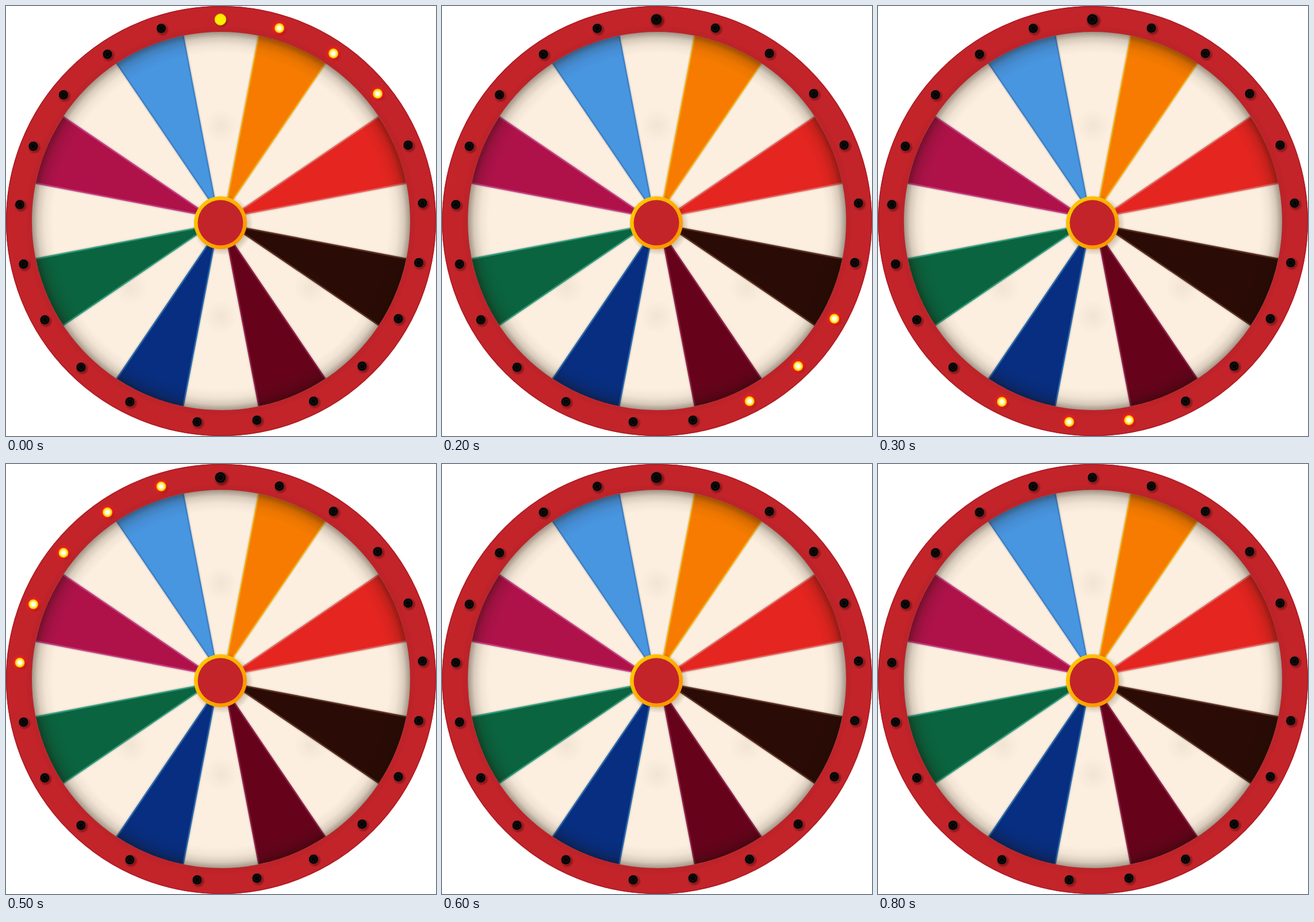
An HTML page for the animation above (0.9 s loop, 748 px wide and 748 px high).

```html
<!DOCTYPE html>
<html lang="en">
<head>
<meta charset="utf-8">
<title>Prize wheel</title>
<style>
  html, body { margin: 0; width: 100%; height: 100%; overflow: hidden; background: #fff; }
  svg { display: block; width: 100vw; height: 100vh; }
  .step { opacity: 0; animation: blink 900ms step-end infinite; }
  @keyframes blink {
    0% { opacity: 1; }
    11.1111%, 100% { opacity: 0; }
  }
</style>
</head>
<body>
<svg viewBox="0 0 748 748">
  <defs>
    <radialGradient id="innerShadow" gradientUnits="userSpaceOnUse" cx="374" cy="374.5" r="330">
      <stop offset=".885" stop-color="#1a0c00" stop-opacity="0"/>
      <stop offset=".93" stop-color="#1a0c00" stop-opacity=".05"/>
      <stop offset=".965" stop-color="#1a0c00" stop-opacity=".16"/>
      <stop offset="1" stop-color="#1a0c00" stop-opacity=".42"/>
    </radialGradient>
    <radialGradient id="smudge">
      <stop offset="0" stop-color="#6b5a40" stop-opacity=".07"/>
      <stop offset="1" stop-color="#6b5a40" stop-opacity="0"/>
    </radialGradient>
    <radialGradient id="hubShadow">
      <stop offset=".78" stop-color="#301800" stop-opacity=".2"/>
      <stop offset="1" stop-color="#301800" stop-opacity="0"/>
    </radialGradient>
    <linearGradient id="gold" x1="0" y1="0" x2="1" y2="1">
      <stop offset=".2" stop-color="#ffc400"/>
      <stop offset=".8" stop-color="#ff9800"/>
    </linearGradient>
    <radialGradient id="bulbShadow">
      <stop offset=".6" stop-color="#4a0508" stop-opacity=".5"/>
      <stop offset="1" stop-color="#4a0508" stop-opacity="0"/>
    </radialGradient>
    <radialGradient id="glow">
      <stop offset=".55" stop-color="#ff2018"/>
      <stop offset="1" stop-color="#f02020" stop-opacity="0"/>
    </radialGradient>
    <radialGradient id="lamp">
      <stop offset=".3" stop-color="#fffff4"/>
      <stop offset=".6" stop-color="#fff27a"/>
      <stop offset=".82" stop-color="#ffdc00"/>
      <stop offset="1" stop-color="#ffb400"/>
    </radialGradient>
    <radialGradient id="dimLamp">
      <stop offset="0" stop-color="#ffe27a"/>
      <stop offset=".6" stop-color="#ffc62e"/>
      <stop offset="1" stop-color="#f09a10"/>
    </radialGradient>
    <g id="dark">
      <circle cx="2" cy="2" r="12" fill="url(#bulbShadow)"/>
      <circle r="8.4" fill="#050303" stroke="#e0605a" stroke-opacity=".5" stroke-width=".7"/>
      <circle r="4.5" fill="none" stroke="#292323" stroke-width=".8"/>
    </g>
    <g id="lit">
      <circle r="14" fill="url(#glow)"/>
      <circle r="8.4" fill="url(#lamp)"/>
    </g>
    <g id="dim">
      <circle r="8.6" fill="url(#dimLamp)"/>
    </g>
    <g id="yellow">
      <circle r="10" fill="#ffee00" stroke="#f0a000" stroke-width="1"/>
    </g>
  </defs>
  <circle cx="374" cy="374" r="331" fill="#fcefdf"/>
  <g id="sectors"></g>
  <g id="smudges" fill="url(#smudge)"></g>
  <circle cx="374" cy="374" r="330" fill="url(#innerShadow)"/>
  <g fill="none">
    <circle cx="374" cy="374" r="351.5" stroke="#c3242a" stroke-width="45"/>
    <circle cx="374" cy="374" r="333.5" stroke="#000" stroke-opacity=".03" stroke-width="9"/>
    <circle cx="374" cy="374" r="373" stroke="#b01f27" stroke-width="2"/>
  </g>
  <circle cx="377" cy="381" r="53" fill="url(#hubShadow)"/>
  <circle cx="373" cy="377" r="46" fill="url(#gold)"/>
  <circle cx="373" cy="377" r="39.5" fill="#c3242a"/>
  <g id="bulbs"></g>
</svg>
<script>
  const CENTER = 374, RADIUS = 329, TIP_RADIUS = 20, HALF_ANGLE = 10.95;
  const STEP_MS = 100, LOOP_MS = 900;
  const byId = id => document.getElementById(id);

  // Fill and edge colour, clockwise from the sector right of the top.
  const sectors = [
    ['#f67b00', '#f3a80c'], ['#e42520', '#e6605c'],
    ['#2a0b05', '#5c3022'], ['#66031b', '#8f2049'],
    ['#072e80', '#2866aa'], ['#0a643f', '#309a7b'],
    ['#ae1249', '#c63d82'], ['#4895e0', '#3f80c6']
  ];

  const polar = (radius, degrees) => {
    const a = degrees * Math.PI / 180;
    return `${CENTER + radius * Math.sin(a)} ${CENTER - radius * Math.cos(a)}`;
  };

  byId('sectors').innerHTML = sectors.map(([fill, edge], i) => {
    const middle = 22.5 + i * 45;
    const from = polar(RADIUS, middle - HALF_ANGLE), to = polar(RADIUS, middle + HALF_ANGLE);
    const sides = `M${from}L${polar(TIP_RADIUS, middle)}L${to}`;
    return `<path d="${sides}" fill="none" stroke="#e9dfd0" stroke-width="7"/>
      <path d="${sides}A${RADIUS} ${RADIUS} 0 0 0 ${from}Z" fill="${fill}"/>
      <path d="${sides}" fill="none" stroke="${edge}" stroke-width="2.6"/>`;
  }).join('');

  byId('smudges').innerHTML = [[374, 208], [374, 540], [530, 490], [217, 490]]
    .map(([x, y]) => `<circle cx="${x}" cy="${y}" r="30"/>`).join('');

  const bulbs = [
    [373, 23.5], [475.5, 38.5], [569.5, 82.5], [646.5, 152.5], [699.5, 242],
    [724.5, 343], [718, 446.5], [682.5, 544], [619.5, 626.5], [535, 687.5],
    [436.5, 720.5], [332.5, 723.5], [215.5, 688.5], [130.5, 628.5], [67.5, 546],
    [30.5, 449], [24, 345.5], [47.5, 244], [100, 154.5], [176.5, 84], [270, 39]
  ];
  const bulb = (kind, i, scale = 1) =>
    `<use href="#${kind}" transform="translate(${bulbs[i]}) scale(${scale})"/>`;
  const all = kind => bulbs.map((_, i) => bulb(kind, i)).join('');
  const run = (first, last) => {
    let out = '';
    for (let i = first; i <= last; i++) out += bulb('lit', i);
    return out;
  };

  const topOff = bulb('dark', 0, 1.17);
  const steps = [
    bulb('yellow', 0) + run(1, 3),
    topOff + run(4, 6),
    topOff + run(7, 9),
    topOff + run(10, 12),
    topOff + bulb('dim', 10) + run(13, 15),
    topOff + run(16, 20),
    topOff,
    all('lit'),
    ''
  ];

  byId('bulbs').innerHTML = all('dark') + steps.map((content, i) =>
    `<g class="step" style="animation-delay:${i * STEP_MS - LOOP_MS}ms">${content}</g>`).join('');
</script>
</body>
</html>
```
